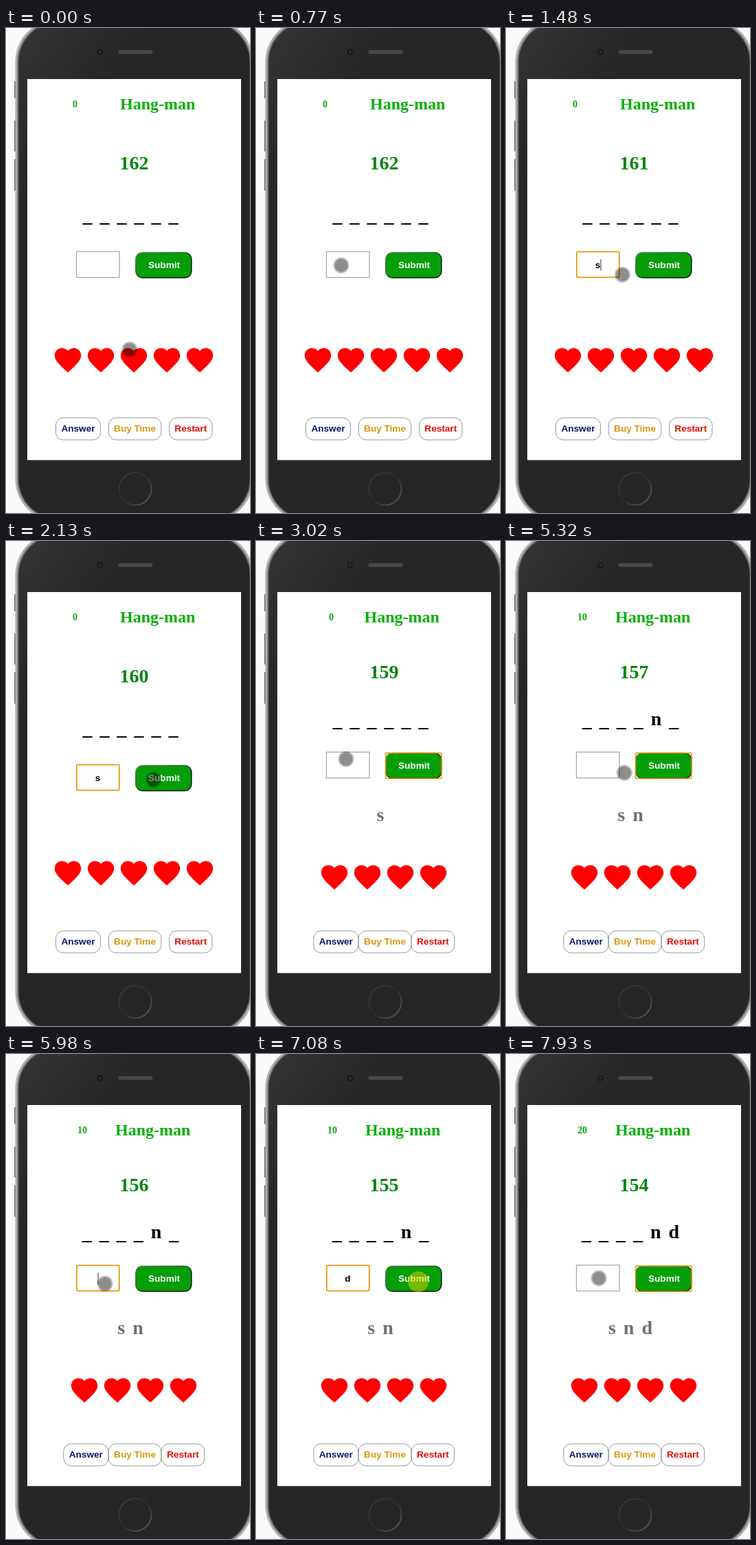
These frames come from a looping animation (355x703 px, 8000 ms). An HTML page:

```html
<!DOCTYPE html>
<html lang="en">
<head>
<meta charset="utf-8">
<title>Word game</title>
<style>
  html, body { margin: 0; width: 100%; height: 100%; overflow: hidden; background: #fafafa; }
  svg { display: block; }
  text { font-weight: bold; white-space: pre; }
  .serif { font-family: "Liberation Serif", "Times New Roman", serif; }
  .sans { font-family: "Liberation Sans", Arial, sans-serif; font-size: 13.6px; }
  .mid { text-anchor: middle; }
  .spaced { font-size: 28px; letter-spacing: 2px; }
</style>
</head>
<body>
<svg width="355" height="703" viewBox="0 0 355 703">
  <defs>
    <linearGradient id="bevel" x1="0" y1="0" x2="1" y2="1">
      <stop offset="0" stop-color="#5f7f5f"/><stop offset=".45" stop-color="#2b5a2b"/><stop offset=".6" stop-color="#0a140a"/>
    </linearGradient>
    <linearGradient id="ring" x1="0" y1="0" x2="1" y2="1">
      <stop offset="0" stop-color="#3c3c3e"/><stop offset=".5" stop-color="#2c2c2e"/><stop offset="1" stop-color="#606064"/>
    </linearGradient>
    <linearGradient id="body" gradientUnits="userSpaceOnUse" x1="20" y1="0" x2="140" y2="90">
      <stop offset="0" stop-color="#343434"/><stop offset="1" stop-color="#262626"/>
    </linearGradient>
    <path id="heart" d="M12 21.35l-1.45-1.32C5.4 15.36 2 12.28 2 8.5 2 5.42 4.42 3 7.5 3c1.74 0 3.41.81 4.5 2.09C13.09 3.81 14.76 3 16.5 3 19.58 3 22 5.42 22 8.5c0 3.78-3.4 6.86-8.55 11.54z"/>
  </defs>

  <g fill="#777">
    <rect x="12" y="77" width="4" height="25" rx="1"/>
    <rect x="12" y="134" width="4" height="45" rx="1"/>
    <rect x="12" y="190" width="4" height="46" rx="1"/>
  </g>
  <rect x="13.500" y="-13" width="346" height="729" rx="62" fill="#b0b0b0"/>
  <rect x="16.500" y="-10" width="340" height="723" rx="59" fill="#6c6c6c"/>
  <rect x="18.500" y="-8" width="336" height="719" rx="57" fill="url(#body)"/>
  <circle cx="137" cy="35" r="4.500" fill="#1c1c1e"/>
  <circle cx="137" cy="35" r="1.500" fill="#3a3c44"/>
  <rect x="163.500" y="32" width="50" height="5.500" rx="2.700" fill="#484848"/>
  <circle cx="188" cy="668" r="23.500" fill="none" stroke="url(#ring)" stroke-width="2"/>
  <rect x="31" y="74" width="311" height="552.300" fill="#fff"/>

  <text id="score" class="serif" y="115" font-size="14" fill="#0aa50a"></text>
  <text id="title" class="serif" y="118" font-size="24" fill="#0aae0a">Hang-man</text>
  <text id="timer" class="serif mid" x="186.500" font-size="28" fill="#04850a"></text>
  <text id="word" class="serif mid spaced" x="186.500" fill="#000"></text>
  <text id="guesses" class="serif mid spaced" x="186.500" y="406" fill="#707070"></text>

  <g id="form">
    <rect id="field" fill="#fff"/>
    <text id="letter" class="sans mid" x="133.500" y="348"></text>
    <rect id="caret" y="335" width="1" height="17" fill="#333"/>
    <rect x="188.800" y="325.500" width="81" height="36.500" rx="9.500" fill="#049f08" stroke="url(#bevel)" stroke-width="1.500"/>
    <rect id="outline" x="188.500" y="325.300" width="81.500" height="37" rx="2" fill="none" stroke="#e5970c" stroke-width="1.600"/>
    <text class="sans mid" x="230" y="348" fill="#fff">Submit</text>
  </g>

  <g id="hearts" fill="red"></g>
  <g id="buttons"></g>

  <g id="pointer">
    <g id="dot">
      <circle r="11.500" fill-opacity=".25"/>
      <circle r="9.500" fill-opacity=".26"/>
    </g>
    <circle id="halo" r="15" fill="#d8d000" fill-opacity=".53"/>
  </g>
</svg>
<script>
const LOOP = 8000;
const $ = id => document.getElementById(id);
const set = (el, attrs) => { for (const k in attrs) el.setAttribute(k, attrs[k]); };
const show = (el, on) => el.setAttribute('visibility', on ? 'visible' : 'hidden');
const add = (parent, tag, attrs, text = '') => {
  const el = document.createElementNS('http://www.w3.org/2000/svg', tag);
  set(el, attrs);
  el.textContent = text;
  return parent.appendChild(el);
};

// Pointer stops: time, x, y
const path = [
  [20, 180, 466], [600, 124, 344], [800, 124, 344], [920, 142, 353], [1240, 142, 353],
  [1680, 190, 361], [2010, 215, 346], [2290, 214, 346], [2860, 131, 316], [4000, 131, 316],
  [4330, 206, 327], [4500, 206, 327], [4640, 214, 325], [4930, 214, 325], [5340, 172, 336],
  [5660, 144, 333], [6470, 144, 333], [7050, 236, 330], [7320, 236, 330], [7800, 135, 325]
];
const presses = [[600, 770], [1990, 2130], [2870, 3020], [4620, 4780], [5680, 5840], [7060, 7220], [7830, 7930]];

// Each round: focus on the field, letter typed, letter submitted
const rounds = [
  { focus: 920, type: 1240, submit: 2210, letter: 's' },
  { focus: 3130, type: 4240, submit: 4900, letter: 'n' },
  { focus: 5960, type: 6440, submit: 7300, letter: 'd' }
];
// Result after each submission
const results = [
  { score: 0, scoreX: 97, titleX: 166, word: '______', guesses: '' },
  { score: 0, scoreX: 106, titleX: 157.5, word: '______', guesses: 's' },
  { score: 10, scoreX: 104, titleX: 159, word: '____n_', guesses: 'sn' },
  { score: 20, scoreX: 104, titleX: 159, word: '____nd', guesses: 'snd' }
];
const spaced = s => [...s].map(c => c + '\u00a0').join('');

// Blanks hang slightly below the letters' baseline
const BLANK_DROP = 2;
function setWord(word) {
  const el = $('word');
  if (el.dataset.word === word) return;
  el.dataset.word = word;
  el.textContent = '';
  word.match(/_+|[^_]+/g).forEach((run, i) => {
    const dy = run[0] === '_' ? BLANK_DROP : i ? -BLANK_DROP : 0;
    add(el, 'tspan', { dy }, spaced(run));
  });
}

const hearts = Array.from({ length: 5 }, () => add($('hearts'), 'use', { href: '#heart' }));
const buttons = [
  ['Answer', 72.5, 65, '#06186c', 1], ['Buy Time', 149.3, 76.5, '#dc960c', 0], ['Restart', 237.5, 62.5, '#e80c00', -1]
].map(([label, x, w, color, side]) => {
  const g = add($('buttons'), 'g', {});
  add(g, 'rect', { x, y: 565, width: w, height: 32, rx: 11, fill: '#fff', stroke: '#999' });
  add(g, 'text', { x: x + w / 2, y: 585, class: 'sans mid', fill: color }, label);
  return { g, side };
});

function pointerAt(t) {
  const i = path.findIndex(p => p[0] > t);
  if (i === 0) return path[0].slice(1);
  if (i < 0) return path[path.length - 1].slice(1);
  const [t0, x0, y0] = path[i - 1], [t1, x1, y1] = path[i];
  const u = (t - t0) / (t1 - t0), e = u * u * (3 - 2 * u);
  return [x0 + (x1 - x0) * e, y0 + (y1 - y0) * e];
}

function draw(t) {
  const done = rounds.filter(r => t >= r.submit).length;
  const r = rounds[done], state = results[done], moved = done > 0;
  const focused = !!r && t >= r.focus;
  const typed = !!r && t >= r.type;

  $('score').textContent = state.score;
  $('score').setAttribute('x', state.scoreX);
  $('title').setAttribute('x', state.titleX);
  $('timer').textContent = 162 - Math.floor((t + 130) / 1000);
  $('timer').setAttribute('y', moved ? 199 : 205);
  setWord(state.word);
  $('word').setAttribute('y', moved ? 267 : 279);
  $('guesses').textContent = spaced(state.guesses);

  $('form').setAttribute('transform', `translate(0 ${moved ? -18 : 0})`);
  set($('field'), focused
    ? { x: 102.8, y: 324.3, width: 62, height: 37, rx: 1.5, stroke: '#e5970c', 'stroke-width': 1.8 }
    : { x: 102.5, y: 324, width: 62.5, height: 37.5, rx: 0, stroke: '#a2a2a2', 'stroke-width': 1.2 });
  $('letter').textContent = typed ? r.letter : '';
  $('caret').setAttribute('x', typed ? 137.5 : 133.5);
  show($('caret'), focused && (t - (typed ? r.type : r.focus)) % 1000 < 500);
  show($('outline'), moved && !focused);

  hearts.forEach((h, i) => {
    const x = (moved ? 114 : 90) + 48 * i, y = moved ? 470 : 464;
    h.setAttribute('transform', `translate(${x - 23} ${y - 5.7}) scale(1.92)`);
    show(h, i < (moved ? 4 : 5));
  });
  buttons.forEach(({ g, side }) => g.setAttribute('transform', `translate(${moved ? side * 11.3 : 0} 0)`));

  const pressed = presses.some(([a, b]) => t >= a && t < b);
  $('pointer').setAttribute('transform', `translate(${pointerAt(t).join(' ')})`);
  show($('dot'), !pressed);
  show($('halo'), pressed);
}

const start = performance.now();
function tick() {
  draw((performance.now() - start) % LOOP);
  requestAnimationFrame(tick);
}
draw(0);
requestAnimationFrame(tick);
</script>
</body>
</html>
```
